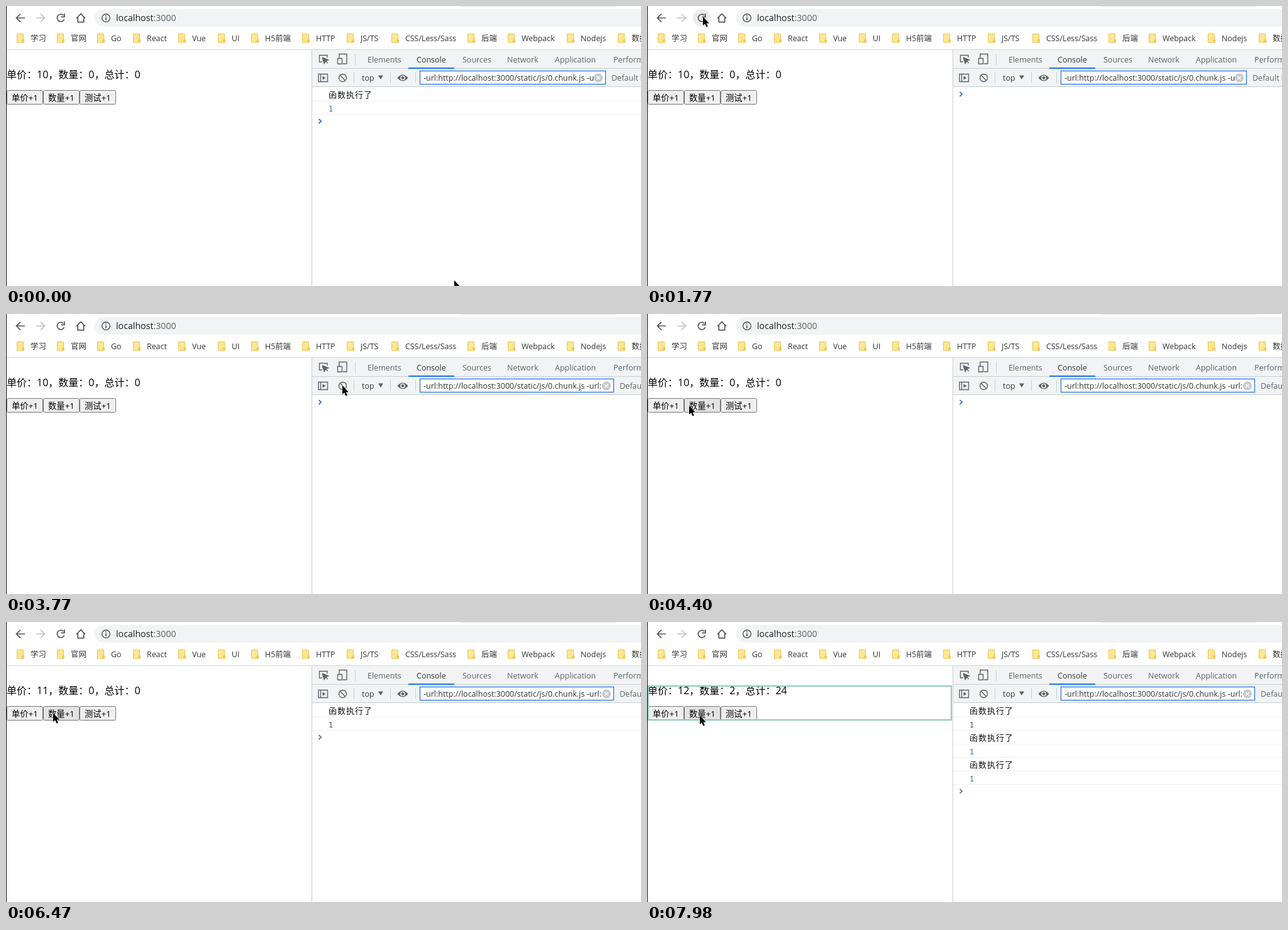
An HTML page that plays this animation: 1010x446 px, repeating every 8000 ms.

```html
<!DOCTYPE html>
<html lang="zh-CN">
<head>
<meta charset="utf-8">
<style>
html, body { margin: 0; width: 100%; height: 100%; overflow: hidden; background: #fff; }
svg { display: block; width: 1010px; height: 446px; }
text { font: 12.5px "Open Sans", "Noto Sans CJK SC", "Noto Sans CJK", sans-serif; fill: #333; white-space: pre; }
.page { font-size: 16px; fill: #000; }
.button { font-size: 13.33px; fill: #000; }
.url { font-size: 14.2px; fill: #202124; }
.mark { font-size: 12.4px; }
.muted { fill: #5f6368; }
.log { font-size: 13px; font-weight: 300; letter-spacing: 1px; fill: #111; }
.value { font: 12px "Noto Sans Mono", "DejaVu Sans Mono", monospace; }
.icon { fill: none; stroke: #50545a; stroke-width: 1.7; }
.tool { fill: none; stroke: #5f6368; stroke-width: 1.4; }
</style>
</head>
<body>
<svg viewBox="0 0 1010 446">
  <!-- browser bar -->
  <rect width="1010" height="446" fill="#fff"/>
  <rect x="721" width="249" height="1" fill="#e3e5e8"/>
  <rect x="141" y="5" width="900" height="28" rx="14" fill="#f1f3f4"/>
  <g class="icon">
    <path d="M30 19H17M23 12.5L16.5 19L23 25.5"/>
    <path d="M48 19H61M55 12.5L61.5 19L55 25.5" stroke="#bdc1c6" style="stroke:#bdc1c6"/>
    <path d="M112 19.5L119 12.5L126 19.5M114.3 18V25.6H123.7V18"/>
    <circle cx="159" cy="19" r="6.3" stroke-width="1.4"/>
    <path d="M159 18V22.5M159 15V16.6"/>
  </g>
  <circle id="reloadHover" cx="87" cy="19" r="14" fill="#ececee"/>
  <g class="icon">
    <path id="reload" d="M92.6 21.2A5.8 5.8 0 1 1 91.3 14.9M92.9 12V17.4H87.5"/>
    <path id="stop" d="M82 14L92 24M92 14L82 24"/>
  </g>
  <text class="url" x="175" y="24">localhost<tspan fill="#5f6368">:3000</tspan></text>
  <g id="bookmarks"></g>
  <rect y="69" width="1010" height="1" fill="#d5d7da"/>

  <!-- page -->
  <text id="summary" class="page" x="1" y="115"></text>
  <g id="buttons"></g>
  <rect id="outline" x="2" y="102" width="482" height="54" fill="none" stroke="#8bcabd" stroke-width="2"/>

  <!-- developer tools -->
  <rect x="487" y="70" width="523" height="58" fill="#f1f3f4"/>
  <path d="M486.5 70V446M487 99.5H1010M487 128.5H1010M555.5 77V94M553.5 105V123M611.5 105V123M651.5 105V123" stroke="#cacdd1"/>
  <rect x="640" y="98" width="73" height="2" fill="#1a73e8"/>
  <g id="tabs"></g>
  <g class="tool">
    <path d="M503 89H498.5V78.5H511V82"/>
    <path d="M503 82L512.5 86L508.5 87.4L511.8 91M503 82L506.2 91.5L508.5 87.4" fill="#5f6368"/>
    <path d="M530 83V76.5H542V92H536M527.5 83.5H534.5V92.3H527.5Z"/>
    <path d="M497 108.5H511.5V120.5H497ZM500.5 108V121"/>
    <path d="M503.5 111.5V117.5L508.5 114.5Z" fill="#5f6368" stroke="none"/>
    <circle cx="535.5" cy="114.5" r="6"/><path d="M531.3 110.3L539.7 118.7"/>
    <path d="M622.5 114.5Q631 104.5 639.5 114.5Q631 124.5 622.5 114.5Z" fill="#5f6368" stroke="none"/>
    <circle cx="631" cy="114.5" r="3.1" stroke="#fff"/>
  </g>
  <text x="566" y="119">top</text>
  <path d="M592 110.5H600L596 117Z" fill="#5f6368"/>
  <rect id="field" x="658.5" y="103.5" height="21" fill="#fff" stroke="#1a73e8" stroke-width="1.2"/>
  <clipPath id="fieldClip"><rect id="fieldInner" x="660" y="104" height="20"/></clipPath>
  <text x="664" y="119" clip-path="url(#fieldClip)">-url:http://localhost:3000/static/js/0.chunk.js -url:http</text>
  <g id="fieldEnd">
    <circle cx="942" cy="114.5" r="7" fill="#c6c9cc"/>
    <path d="M939.2 111.7L944.8 117.3M944.8 111.7L939.2 117.3" stroke="#fff" stroke-width="1.4"/>
    <text class="muted" x="963" y="119">Default levels</text>
  </g>
  <g id="logs"></g>
  <path id="prompt" d="M497.5 180L501.3 183.5L497.5 187" fill="none" stroke-width="1.7"/>

  <rect width="1" height="446" fill="#111"/>
  <circle id="halo" r="12" fill="#eded58" style="mix-blend-mode:multiply"/>
  <path id="cursor" d="M0 0V14L3.1 11.2L5.5 16.6L7.9 15.6L5.6 10.4H9.8Z" stroke="#fff" stroke-width=".8" paint-order="stroke"/>
</svg>
<script>
const LOOP = 8000, STEP = 68, ROW = 21.5;
const el = id => document.getElementById(id);
const show = (id, on) => el(id).setAttribute('visibility', on ? 'visible' : 'hidden');
const label = (x, y, text, cls) => `<text x="${x}" y="${y}" class="${cls}">${text}</text>`;

const bookmarks = [['学习', 39], ['官网', 103], ['Go', 167], ['React', 224], ['Vue', 296], ['UI', 359],
  ['H5前端', 412], ['HTTP', 493], ['JS/TS', 564], ['CSS/Less/Sass', 635], ['后端', 756],
  ['Webpack', 820], ['Nodejs', 914], ['数据', 995]];
el('bookmarks').innerHTML = bookmarks.map(([name, x]) =>
  `<path transform="translate(${x - 22} 44)" d="M.5 .5H10.5V9.5H11.5V14H.5Z" fill="#ffe694" stroke="#e8c34c"/>` +
  `<path transform="translate(${x - 22} 44)" d="M8 14V9.5H11.5V14Z" fill="#f3cb50"/>` +
  label(x, 56, name, 'mark')).join('');

const tabs = [['Elements', 575], ['Console', 653], ['Sources', 726], ['Network', 797],
  ['Application', 873], ['Performance', 966]];
el('tabs').innerHTML = tabs.map(([name, x]) => label(x, 90, name, name === 'Console' ? '' : 'muted')).join('');

el('buttons').innerHTML = ['单价+1', '数量+1', '测试+1'].map((name, i) =>
  `<rect x="${1.5 + 58 * i}" y="134.5" width="57" height="22" rx="2" stroke="#767676"/>` +
  label(9 + 58 * i, 151, name, 'button')).join('');
const buttons = el('buttons').querySelectorAll('rect');

el('logs').innerHTML = [0, 1, 2].map(i => {
  const y = 129 + 2 * ROW * i, line = Math.floor(y + ROW) + 1.5;
  return `<g><path d="M487 ${line}H1010M487 ${line + 21}H1010" stroke="#f0f0f0"/>` +
    label(513, y + 17, '函数执行了', 'log') + label(513, y + 38.5, '1', 'value') + '</g>';
}).join('');
const logs = [...el('logs').children];

// time, x, y of the pointer tip
const path = [[0, 713, 437], [70, 711, 436], [300, 560, 330], [600, 270, 125], [820, 136, 46], [1100, 95, 20],
  [1450, 89, 17], [2330, 89, 17], [2790, 432, 125], [2930, 428, 125], [3220, 531, 141], [3430, 654, 184],
  [3650, 535, 114], [3800, 535, 114], [4050, 380, 238], [4390, 28, 134], [4440, 28, 134], [4530, 28, 138],
  [4600, 27, 141], [6050, 27, 141], [6400, 75, 145], [6520, 75, 145], [6700, 30, 143], [6900, 30, 143],
  [7220, 82, 149], [7880, 82, 149], [7910, 84, 149], [LOOP, 84, 149]];
const logCount = [[0, 1], [1640, 0], [1970, 1], [3770, 0], [4880, 1], [6810, 2], [7380, 3]];
const prices = [[0, 10], [4880, 11], [6810, 12]];
const amounts = [[0, 0], [7380, 1], [7980, 2]];
const promptColors = [[0, '#1a73e8'], [1640, '#4a74b8'], [1970, '#6e6e78'], [3770, '#4a74b8'],
  [4880, '#6e6e78'], [6810, '#3a8ac8'], [7380, '#5f7fa5']];
const clicks = [[1500, 1640], [3650, 3770], [4810, 4900], [6740, 6860], [7290, 7400], [7910, 7970]];
const outlines = [[4880, 5150], [6810, 7100], [7380, 7710], [7980, LOOP]];

const at = (steps, t) => steps.filter(s => s[0] <= t).pop()[1];
const within = (spans, t) => spans.some(([from, to]) => t >= from && t < to);

function pointer(t) {
  const i = path.findIndex(p => p[0] > t), [t0, x0, y0] = path[i - 1], [t1, x1, y1] = path[i];
  const k = (t - t0) / (t1 - t0);
  return [Math.round(x0 + (x1 - x0) * k), Math.round(y0 + (y1 - y0) * k)];
}

function draw(t) {
  const [x, y] = pointer(Math.floor(t / STEP) * STEP);
  const place = `translate(${x} ${y})`;
  const price = at(prices, t), amount = at(amounts, t), count = at(logCount, t);
  const pressed = within(clicks, t);

  el('cursor').setAttribute('transform', place);
  el('halo').setAttribute('transform', place);
  show('halo', pressed);
  show('outline', within(outlines, t));
  show('reloadHover', Math.hypot(x - 87, y - 19) < 14);
  const loading = t >= 1840 && t < 2240;
  show('stop', loading);
  show('reload', !loading);
  el('reload').style.opacity = t >= 2240 && t < 2380 ? .5 : 1;

  el('summary').textContent = `单价：${price}，数量：${amount}，总计：${price * amount}`;
  buttons.forEach((button, i) => {
    const over = y >= 136 && y < 157 && x >= 1 + 58 * i && x < 59 + 58 * i;
    button.setAttribute('fill', !over ? '#efefef' : pressed ? '#f5f5f5' : '#e3e3e3');
  });

  logs.forEach((log, i) => {
    log.setAttribute('visibility', i < count ? 'visible' : 'hidden');
    log.querySelector('.value').style.fill = i || t < 1640 ? '#2a62ad' : '#3c4043';
  });
  el('prompt').setAttribute('transform', `translate(0 ${(count - 1) * 2 * ROW})`);
  el('prompt').setAttribute('stroke', at(promptColors, t));

  const extra = t >= 3770 ? 13 : 0;
  el('field').setAttribute('width', 295 + extra);
  el('fieldInner').setAttribute('width', 275 + extra);
  el('fieldEnd').setAttribute('transform', `translate(${extra} 0)`);
}

const start = performance.now();
function tick() {
  draw((performance.now() - start) % LOOP);
  requestAnimationFrame(tick);
}
tick();
</script>
</body>
</html>
```
